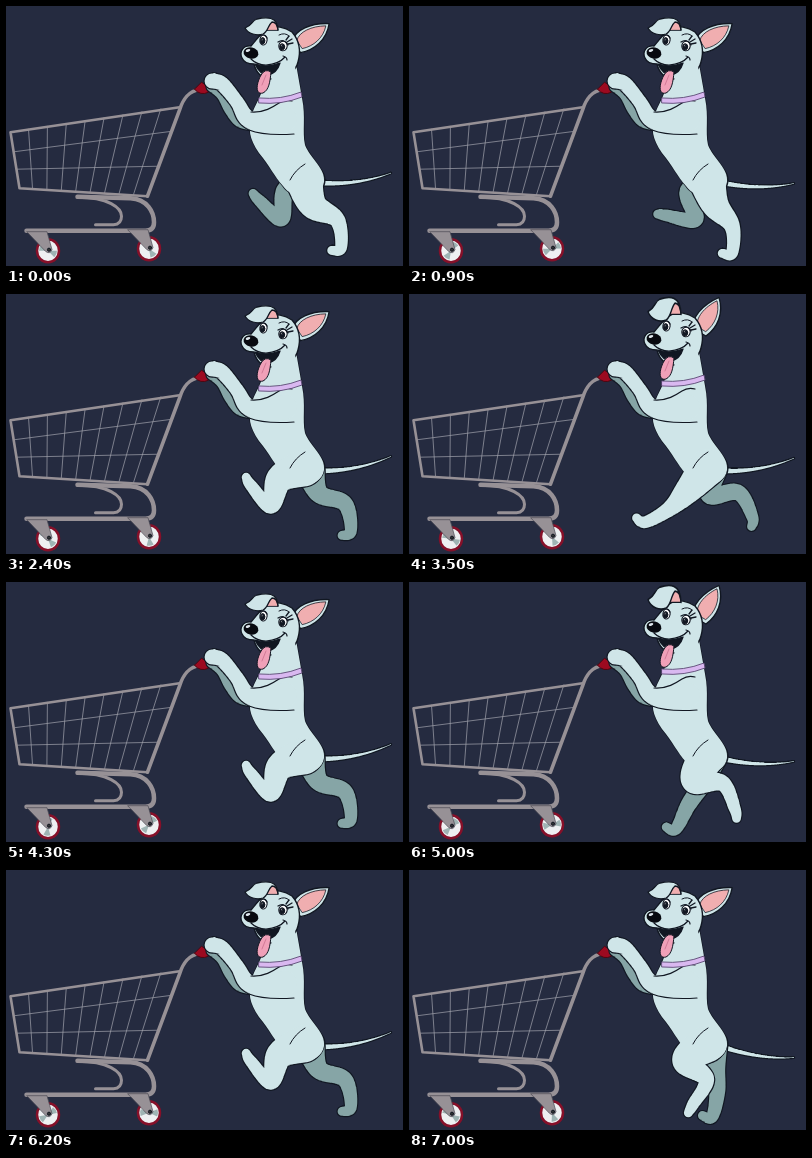
An HTML page with a canvas that plays this animation: 397 px wide and 260 px high, repeating every 7100 ms.

```html
<!DOCTYPE html>
<html lang="en">
<head>
<meta charset="utf-8">
<title>Dog pushing a cart</title>
<style>
html, body { margin: 0; width: 100%; height: 100%; overflow: hidden; background: #252b40; }
canvas { display: block; }
</style>
</head>
<body>
<canvas id="stage" width="397" height="260"></canvas>
<script>
const ctx = document.getElementById('stage').getContext('2d');
const LOOP = 7100, STEP = 100, STRIDE = 950, TAU = Math.PI * 2, DEG = Math.PI / 180;
const INK = '#111722', COAT = '#cfe5e8', SHADE = '#86a5a6', PINK = '#f0aeb0',
      METAL = '#979196', RED = '#9c0a20', WIRE = '#a2a4ae';
const HIP = [298, 174], GROUND = 247;
const BONES = [27, 28, 28];
const LEG_RADII = [19, 14, 8.5, 6.5, 5];

const wave = (phase, peak) => Math.cos(TAU * (phase - peak));
const clamp = v => Math.max(0, Math.min(1, v));

function draw(path, fill, stroke = INK, width = 1.3) {
  if (typeof path === 'string') path = new Path2D(path);
  ctx.lineWidth = width;
  if (fill) { ctx.fillStyle = fill; ctx.fill(path); }
  if (stroke) { ctx.strokeStyle = stroke; ctx.stroke(path); }
}
const line = (d, color = INK, width = 1.2) => draw(d, null, color, width);

function oval(x, y, rx, ry, fill, stroke, turn = 0, width = 1) {
  const path = new Path2D();
  path.ellipse(x, y, rx, ry, turn, 0, TAU);
  draw(path, fill, stroke, width);
}

// Draws within a moved, turned and scaled space
function placed(x, y, paint, turn = 0, sx = 1, sy = sx) {
  ctx.save();
  ctx.translate(x, y);
  ctx.rotate(turn);
  ctx.scale(sx, sy);
  paint();
  ctx.restore();
}

// Smooth tapered limb through [x, y] joints
function limb(points, radii, grow, color) {
  const n = radii.length;
  const at = i => {
    const j = Math.max(0, Math.min(n - 1, i));
    return [...points[j], radii[j]];
  };
  ctx.fillStyle = color;
  ctx.beginPath();
  for (let s = 0; s <= n - 1; s += .04) {
    const i = Math.floor(s), u = s - i;
    const [a, b, c, d] = [at(i - 1), at(i), at(i + 1), at(i + 2)];
    const [x, y, r] = b.map((v, k) => v + .5 * u * (c[k] - a[k] +
      u * (2 * a[k] - 5 * v + 4 * c[k] - d[k] + u * (3 * (v - c[k]) + d[k] - a[k]))));
    const size = Math.max(.3, r + grow);
    ctx.moveTo(x + size, y);
    ctx.arc(x, y, size, 0, TAU);
  }
  ctx.fill();
}
function outlinedLimb(points, radii, color) {
  limb(points, radii, .6, INK);
  limb(points, radii, -.6, color);
}

// Joints of a walking leg; angles are degrees forward of straight down
function leg(phase, shift = 0) {
  const kick = Math.cos(Math.PI * (phase - .52)) ** 8;
  const thigh = 23 + 43 * wave(phase, .5);
  const shank = -25 + 70 * wave(phase, .67);
  const foot = -8 - 25 * Math.sin(TAU * phase) + 140 * kick;
  const paw = foot + 90 * (.5 + .5 * wave(phase, .9));
  let x = 0, y = 0;
  const reach = (angle, length) => [x -= length * Math.sin(angle * DEG), y += length * Math.cos(angle * DEG)];
  const joints = [[0, 0], ...[thigh, shank, foot].map((angle, i) => reach(angle, BONES[i]))];
  const squash = Math.min(1, (GROUND - HIP[1]) / y);
  joints.push(reach(paw, 10));
  return joints.map(([jx, jy]) => [HIP[0] + shift + jx, Math.min(HIP[1] + jy * squash, 250)]);
}

function wheel(x, y, angle) {
  oval(x, y, 11, 11.5, '#eef0f2', '#861029', 0, 2.5);
  for (const turn of [0, Math.PI]) {
    const wedge = new Path2D();
    wedge.moveTo(x, y);
    wedge.arc(x, y, 9, angle + turn, angle + turn + .8);
    draw(wedge, '#9fb4b4', null);
  }
  draw(`M${x - 21} ${y - 19}h20l5 18q-2 5 -6 2Z`, METAL, '#4d4b55', .7);
  oval(x + 1, y - 1, 1.6, 1.6, '#333');
}

function cart(angle) {
  for (let i = 0; i < 8; i++)
    line(`M${23 + i * 18.9} ${124 - i * 2.9}L${27 + i * 14.4} ${183 + i}`, WIRE, .7);
  line('M9 146.5L167 126M11 164L154 161', WIRE, .7);
  line('M142 191L14 183L5 127L174 102', METAL, 2.6);
  line('M142 191L174 105C178 92 184 86 194 84', METAL, 3.6);
  line('M72 192C103 192 116 203 116 211Q116 219 108 219.5L90 219.5', METAL, 3);
  line('M72 191.5L125 193C142 194 148.5 207 148.5 217Q148.5 225.5 140 225.5L21 225.5', METAL, 4.5);
  wheel(42.5, 245.5, angle);
  wheel(143.5, 243.5, angle + .6);
  draw('M189 84L196 77Q202 80 203 87Q195 91 189 84Z', RED, '#4a0812', 1);
}

function rightEar() {
  const leaf = 'M0 -6C8 -14 25 -11 40 0C29 12 13 14 0 8Z';
  draw(leaf, COAT, INK, 1.4);
  placed(4, 0, () => draw(leaf, PINK, INK, .9), 0, .8, .72);
}

function leftEar() {
  draw('M13 -4Q16 -15 22 -12L24 -4Z', PINK, INK, .9);
  draw('M24 -4C24 -18 12 -17 3 -15C-3 -13 -1 -9 -9 -6C-6 0 3 2 9 0C14 -2 14 -9 18 -12Q23 -12 24 -4Z', COAT, INK, 1.3);
}

function eye(x, y, rx, ry) {
  oval(x, y, rx, ry, '#fff', INK, .15, 1.1);
  oval(x - .8, y + .8, rx * .6, ry * .64, INK);
  oval(x - 1.2, y - .6, .9, .9, '#fff');
}

function head() {
  draw('M262 23C256 25 252 32 245 40C237 39 233 46 236 52C238 57 244 58 248 58' +
    'C250 66 255 72 264 73C277 72 290 67 292 56C295 45 293 34 286 26C279 21 269 19 262 23Z', COAT, INK, 1.4);
  draw('M265 68L289 59L290 70L266 82Z', COAT, null);
  draw('M249 58Q261 62 274 57Q271 67 262 69Q254 69 249 58Z', INK);
  draw('M255 69Q259 62 265 66C264 76 263 84 257 87C249 89 250 78 255 69Z', '#f0a0b8', INK, 1);
  line('M260 69L256 79', '#c9708e', .8);
  line('M245 53Q251 59 260 59Q273 58 279 51M277 50Q281 51 281 54');
  oval(245, 47, 7.5, 5.6, '#080a10', null, .2);
  oval(242, 44.5, 2.4, 1.3, '#dfe7ee', null, -.3);
  eye(257.5, 34, 3.6, 5);
  eye(277, 40, 4.2, 4.8);
  line('M272 36Q278 32 282 39M281 36L286 33M282 38L287 37M280 34L283 30M254 30Q258 27 261 32M254 30L251 28', INK, 1.3);
  line('M273 29Q279 26 283 30', INK, 1);
}

function dog(phase) {
  const up = clamp((.1 + .5 * wave(2 * phase, .45)) / .4);
  const sway = -wave(2 * phase, .2), tailY = 172 + 16 * sway;
  const tail = [], tailRadii = [];
  for (let k = 0; k <= 1; k += .125) {
    const j = 1 - k;
    tail.push([j * j * 314 + 2 * j * k * 352 + k * k * 385,
               j * j * 177 + j * k * (tailY + 192) + k * k * tailY]);
    tailRadii.push(3 - 2.2 * k);
  }
  outlinedLimb(tail, tailRadii, COAT);

  outlinedLimb(leg(phase + .5, 6), LEG_RADII.map((r, i) => i < 2 ? r - 4 : r), SHADE);
  outlinedLimb([[205, 81], [216, 89], [224, 104], [234, 116], [249, 119]], [5, 6, 6, 6, 6], SHADE);

  const nearLeg = leg(phase);
  const arm = [[206, 75], [216, 78], [231, 96], [241, 112], [258, 117], [279, 113]];
  const armRadii = [8, 8, 7.5, 9, 11, 13];
  const torso = new Path2D('M258 80C253 94 249 99 246 108C242 124 243 132 253 147C264 160 268 170 277 180' +
    'C286 194 315 195 318 176C320 163 304 152 299 139C296 125 300 111 296 92L290 58L263 62Z');
  draw(torso, COAT, INK, 1.4);
  limb(nearLeg, LEG_RADII, .6, INK);
  limb(arm, armRadii, .6, INK);
  draw(torso, COAT, null);
  limb(nearLeg, LEG_RADII, -.6, COAT);
  limb(arm, armRadii, -.6, COAT);
  line('M245 106C258 107 267 101 273 97Q279 93 286 95M243 124Q258 130 288 128');
  line('M299 158Q289 164 284 174', INK, 1);

  placed(0, -2 * up, () => {
    placed(290, 40, rightEar, -(34 + 26 * up) * DEG);
    head();
    placed(248, 28, leftEar, 0, 1, 1 + .4 * up);
  });
  placed(0, -5 * up, () =>
    draw('M253 92Q275 94 295 86L296 91Q276 99 253 97Z', '#d9b8f0', '#5c4a74', .9));
}

function frame(now) {
  const t = Math.floor(now / STEP) * STEP % LOOP;
  ctx.fillStyle = '#252b40';
  ctx.fillRect(0, 0, 397, 260);
  placed(-.5, -.8, () => cart(-t * .026));
  dog(t / STRIDE % 1);
}

ctx.lineCap = ctx.lineJoin = 'round';
const start = performance.now();
function tick() {
  frame(performance.now() - start);
  requestAnimationFrame(tick);
}
tick();
</script>
</body>
</html>
```
